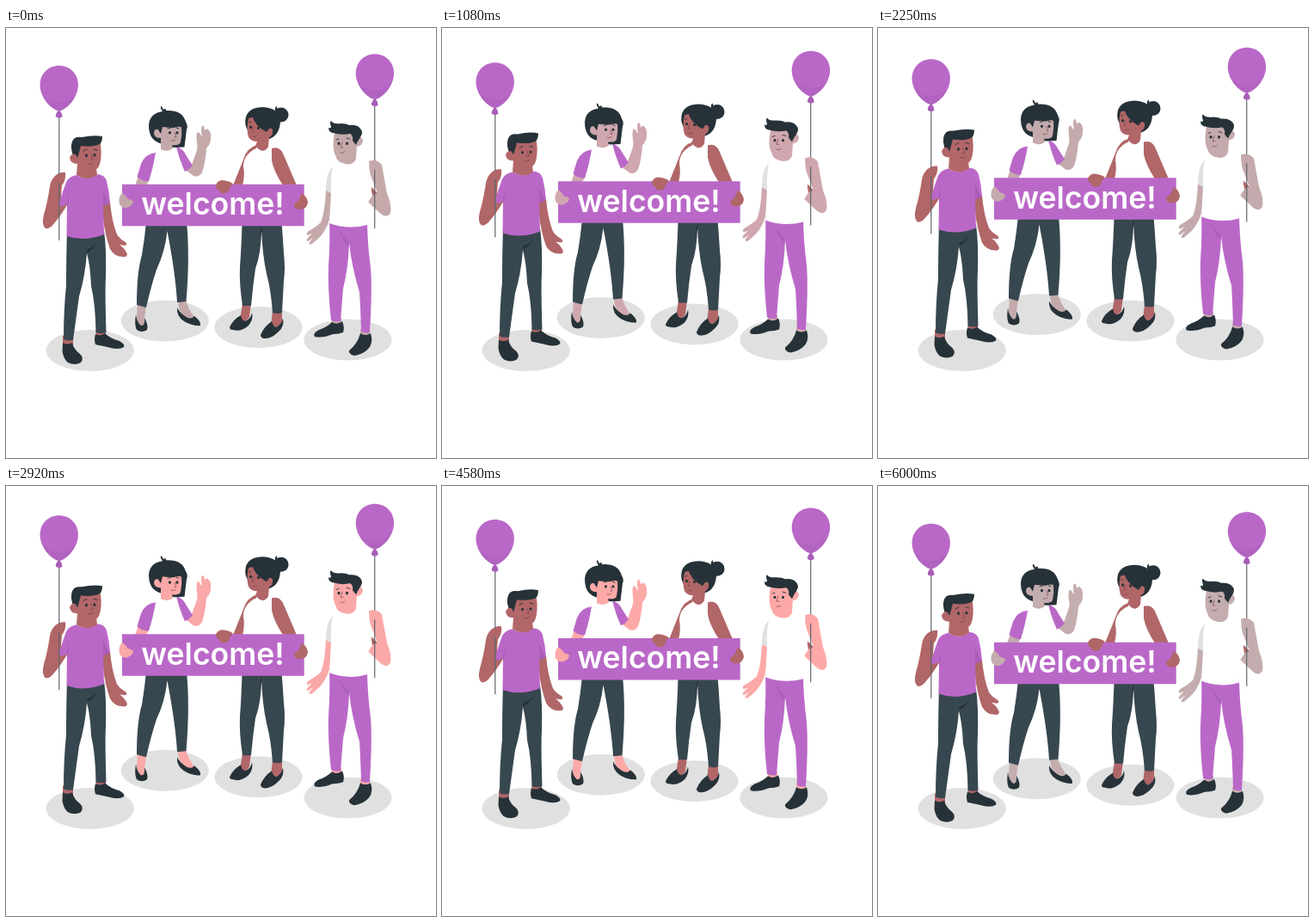
An HTML page for the animation above (6040 ms loop, 500 by 500 pixels).

```html
<!DOCTYPE html>
<html lang="en">
<head>
<meta charset="utf-8">
<title>Welcome</title>
<style>
html, body { margin: 0; width: 100%; height: 100%; overflow: hidden; background: #fff }
svg { display: block; width: 100%; height: 100%; --light: #c5a9aa }
.light { fill: var(--light) }
.brown { fill: #b16668 }
.purple { fill: #ba68c8 }
.shade { fill: #a95db8 }
.slate { fill: #37474f }
.dark { fill: #263238 }
.white { fill: #fff }
.floor { fill: #e0e0e0 }
.line { fill: none; stroke: #263238; stroke-width: .9; stroke-linecap: round; stroke-linejoin: round }
.soft { stroke: #7b4448; opacity: .75 }
.eyes { fill: none; stroke: #263238; stroke-width: 3; stroke-linecap: round }
.string { stroke: #5d666b; stroke-width: 1.2 }
text { font: 600 35.6px Inter, "Open Sans", sans-serif; text-anchor: middle }
</style>
</head>
<body>
<svg viewBox="0 0 500 500">
<defs>
  <g id="balloon">
    <path class="purple" d="M0 53C-11 50-22.2 36-22.2 22.5C-22.2 9-12 0 0 0S22.2 9 22.2 22.5C22.2 36 11 50 0 53Z"/>
    <path class="shade" d="M-19 34Q-13 49 0 53Q13 49 19 34Q11 43 0 43T-19 34Z" opacity=".45"/>
    <path class="shade" d="M-1 52.5Q-5 57-3.6 59.5Q0 62 3.8 59.5Q4 56 1 52.5Z"/>
  </g>
  <ellipse id="floor" class="floor" rx="51" ry="24"/>
</defs>

<use href="#floor" x="97.7" y="375"/>
<use href="#floor" x="397.5" y="362.5"/>

<g id="crew">
  <use href="#floor" x="184.8" y="340.5"/>
  <use href="#floor" x="293.5" y="348"/>

  <!-- woman with a bob, waving -->
  <g>
    <path class="light" d="M153 320L163 322L161 338Q164 346 158 348Q152 346 152 336ZM200 316L209 316Q212 328 220 337Q216 342 208 337Q200 330 200 316Z"/>
    <path class="dark" d="M151 333Q149 345 152 351Q158 355 164 351Q166 346 161 337Q162 347 157 346Q152 342 151 333ZM199 325Q198 335 207 341Q217 347 226 346Q227 341 219 335Q215 340 208 335Q202 331 199 325Z"/>
    <path class="slate" d="M163 226H210Q214 265 209.500 318L199 319Q197 285 187.500 236Q185 260 175 281Q169 299 163 325L152 322Q152 284 158 264Q161 246 163 226Z"/>
    <path class="light" d="M154 172L167 176L161 186H149Z"/>
    <path class="purple" d="M174 145Q162 146 157 158L152.500 173Q159 179 166 178Q171 163 174 145Z"/>
    <path class="light" d="M209 165L216 159L222 142Q223 138 222 133Q221 126 222 122Q224 119 226 124L228 126Q226 117 228 114Q230 112 231 119L234 117Q239 120 238 129Q238 135 233 140Q232 156 228 168Q224 174 218 172Z"/>
    <path class="purple" d="M198 138Q206 140 210 149L217 160Q213 165 208 167Q202 154 198 138Z"/>
    <path class="dark" d="M182 97Q178 91 181 91L183 95Q186 92 186 96Q205 95 209 109Q212 114 210 118L207.500 138.500L195 139L179 134Q166 130 166 113Q167 99 182 97Z"/>
    <path class="light" d="M179 114Q193 117 204 114Q205 124 203 133Q201 137 193 136L194 140Q188 145 180 141L180 128Q173 128 172 123Q172 117 177 118L179 121Z"/>
    <path class="dark" d="M176 106Q190 101 208 108L208 118L203 115Q200 115 198 111L196 116L182 115L180 123L177 118Z"/>
    <path class="eyes" d="M190.500 121.500v.4M199 121.500v.4" stroke-width="2.500"/>
    <path class="line" d="M188 117l4-1M198 116l3 1"/>
    <path class="line soft" d="M196 122l2 5h-2M192 131q3 1 5-1"/>
  </g>

  <!-- woman with a bun -->
  <g>
    <path class="brown" d="M275 320H285L283 336Q278 344 272 340ZM310 328H321L321 342Q315 351 308 346Z"/>
    <path class="dark" d="M260 348Q264 339 273 334Q275 343 280 340Q285 337 286 331Q288 339 282 346Q273 354 264 351Q260 351 260 348ZM296 357Q300 347 309 341Q312 351 317 346Q321 343 322 337Q324 347 317 353Q308 362 300 361Q296 360 296 357Z"/>
    <path class="slate" d="M274.500 226H320.500Q322 245 323 262Q325 279 323 294L321 331Q316 333 310 331Q308 304 303 286Q298 263 297 233Q297 261 290 280Q287 300 285 323H275Q271 296 272 278Q274 250 274.500 226Z"/>
    <path class="dark" d="M297 230L293 255Q295 242 298 236Z"/>
    <path class="brown" d="M292 136Q280 139 276 153L264 183H275Q278 172 276 161Q276 147 291 140ZM309 140Q319 137 323 148L338 183H322Q311 166 309 154Z"/>
    <circle class="dark" cx="320" cy="101" r="8.500"/>
    <path class="dark" d="M313 97Q312 92 315 91Q315 94 317 97ZM279 103Q283 92 299 92Q318 93 319 109Q318 125 306 129Q286 131 280 117Q277 111 279 103Z"/>
    <path class="brown" d="M282 105Q289 102 291 107Q298 111 303 120Q307 114 310 118Q311 125 306 127L305 138Q299 148 290 137L292 132Q285 132 282 127Q279 118 282 105Z"/>
    <path class="dark" d="M286 101Q289 114 303 121L309 112L298 98Z"/>
    <path class="eyes" d="M284.500 115v.4M293.500 116v.4" stroke-width="2.500"/>
    <path class="line" d="M283 110l2-1M293 111l4 2"/>
    <path class="line soft" d="M288 115l-2 6h2M286 126q3 1 5 0"/>
  </g>

  <!-- banner and the hands holding it -->
  <path class="purple" d="M135 181.800H346.700V230.300H135Z"/>
  <text class="white" x="240.500" y="217.300">welcome!</text>
  <path class="light" d="M135 192Q130 197 132 205Q135 210 141 209Q147 207 148 202Q147 200 142 199Q138 193 135 192Z"/>
  <path class="brown" d="M264 181Q258 177 250 177Q244 179 244 184Q245 188 248 188Q248 193 255 192Q260 190 260 186ZM344 192Q350 196 351 203Q350 210 343 211Q336 211 335 207Q335 203 340 201Z"/>

  <!-- man in a purple shirt -->
  <g>
    <path class="brown" d="M66 358H78V370Q71 373 66 369ZM105 350H116V359Q110 363 104 359Z"/>
    <path class="dark" d="M66 366Q71 369 77 366Q79 374 86 379Q91 384 87 389Q80 393 72 389Q67 385 65.500 376ZM104 356Q110 359 115 355Q121 361 132 364Q139 368 137 371Q131 375 118 371L104 368Q102 362 104 356Z"/>
    <path class="slate" d="M71 236H114Q117 258 116 290Q115 305 116.500 354Q110 356 104.500 354Q104 321 99 300Q98 276 94 262Q92 289 85 312L78 363Q72 364 67 362Q67 328 70 299Q70 265 71 236Z"/>
    <path class="dark" d="M95 261Q101 258 106 249Q100 256 94 257Z"/>
    <path class="brown" d="M112 203L121 202Q123 225 129 240Q132 245 139 249Q142 252 138 253L132 252Q138 256 141 263Q140 267 136 266Q126 266 121 257Q115 240 113 222Z"/>
    <path class="brown" d="M69 168Q63 167 57 172Q52 177 51 184Q48 204 44 217Q41 229 46 233Q51 234 56 227Q64 218 72 204L64 196L65 183Q70 177 69 168Z"/>
    <path class="purple" d="M82 171Q95 179 107 170Q115 171 117 178Q120 190 121 203Q117 207 113 206L114 240Q92 249 70.500 242L71 204Q67 209 61 206Q66 190 70 179Q74 172 82 171Z"/>
    <path class="shade" d="M113 206Q114 193 112 185Q116 197 120 203Q117 207 113 206ZM71 204Q72 196 74 192Q73 199 71 211Z"/>
    <path class="brown" d="M83 158L105 163L106 171Q95 179 82 171Z"/>
    <path class="dark" d="M77 132Q79 126 88 127Q102 124 112 126Q112 134 107 137L87 151L79 151Q74 139 77 132Z"/>
    <path class="brown" d="M84 148Q86 141 87 137Q100 139 110 135Q112 152 108 161Q104 168 93 166Q84 164 83 158Q75 158 74 151Q76 145 81 147L83 151Z"/>
    <path class="eyes" d="M93.500 148v.4M103 147.500v.4"/>
    <path class="line" d="M90 143l4-2M102 141l4 1" stroke-width="1.500"/>
    <path class="line soft" d="M99 147l2 6h-3M95 158q4 2 7-1"/>
    <path class="string" d="M61.800 103V247"/>
    <path class="brown" d="M59 172Q66 167 69 169L68 176Q64 181 59 179Z"/>
    <use href="#balloon" x="61.700" y="43.800"/>
  </g>

  <!-- man in a white shirt -->
  <g>
    <path class="light" d="M379 337H390V345Q384 348 379 344ZM412 350H423V358Q417 362 412 358Z"/>
    <path class="dark" d="M379 342Q385 346 391 341Q394 348 392 354Q387 356 380 356Q368 361 359 359Q356 355 364 351Q373 348 379 342ZM412 355Q418 359 424 355Q427 364 423 371Q417 379 405 381Q398 379 399 375Q409 367 412 355Z"/>
    <path class="purple" d="M376 222H420Q420 249 424 279Q426 304 423 354Q417 355 413 353Q412 321 411 307Q402 278 399 250Q398 280 392 303L389 341Q383 342 378 340Q374 304 375 277Q377 248 376 222Z"/>
    <path class="shade" d="M399 250Q394 245 387 235Q392 247 398 254Z"/>
    <path class="light" d="M372 187L379 190Q379 213 375 226Q371 237 364 244L356 251Q352 253 353 249L357 244L351 248Q348 247 351 244L356 239L351 241Q348 239 352 236Q361 231 366 226Q371 214 372 187Z"/>
    <path class="light" d="M423 155Q431 152 437 159Q440 176 443 192Q449 207 447 215Q444 221 437 217Q429 210 419 200L425 188L432 192Q427 179 425 174Q421 164 423 155Z"/>
    <path d="M425 185L432 192L425 195Z" fill="#b16668"/>
    <path class="white" d="M383 158L408 152Q421 157 422 171L426 195L420 204V229Q398 235 376 227L378 192L372 188Q373 169 383 158Z"/>
    <path class="floor" d="M380 161Q372 168 372 189L378 192Q377 175 380 161Z"/>
    <path class="light" d="M383 144L408 136L407 152Q404 160 394 158Q386 156 384 151Z"/>
    <path class="light" d="M382 122Q394 119 407 127Q414 125 415 131Q414 138 407 138Q405 149 395 152Q385 154 382 146Q379 137 382 122Z"/>
    <path class="dark" d="M380 122Q375 121 375 116Q378 117 378 115Q376 109 378 108Q381 112 389 111Q396 111 399 113Q408 112 412 117Q416 121 412 127Q409 131 407 136L403 131Q404 125 400 123Q390 125 380 122Z"/>
    <path class="eyes" d="M387 134v.4M396.500 134v.4"/>
    <path class="line" d="M384 130l3-1M396 128l4 1" stroke-width="1.500"/>
    <path class="line soft" d="M391 133l-2 6h3M389 145q3 1 5-1"/>
    <path class="string" d="M428.700 90V233"/>
    <path class="light" d="M422 155Q430 152 434 157L434 164Q427 166 423 163Z"/>
    <use href="#balloon" x="428.900" y="30.300"/>
  </g>
</g>
</svg>
<script>
const LOOP = 6040, RISE = 10;
const svg = document.querySelector('svg');
const crew = document.getElementById('crew');
// light skin tone over time: [ms, r, g, b]
const tones = [
  [0, 197, 169, 170], [1080, 208, 167, 174], [2250, 196, 170, 172], [2920, 250, 168, 168],
  [3790, 232, 166, 168], [4580, 253, 169, 168], [6000, 196, 173, 174], [LOOP, 197, 169, 170]
];

function toneAt(t) {
  const i = tones.findIndex(k => k[0] > t);
  const a = tones[i - 1], b = tones[i];
  const f = (t - a[0]) / (b[0] - a[0]);
  return `rgb(${[1, 2, 3].map(c => Math.round(a[c] + (b[c] - a[c]) * f))})`;
}

function draw(now) {
  const t = now % LOOP;
  const lift = RISE * (1 - Math.abs(1 - 2 * t / LOOP));
  crew.setAttribute('transform', `translate(0 ${-lift.toFixed(2)})`);
  svg.style.setProperty('--light', toneAt(t));
}

const start = performance.now();
function tick() {
  draw(performance.now() - start);
  requestAnimationFrame(tick);
}
tick();
</script>
</body>
</html>
```
